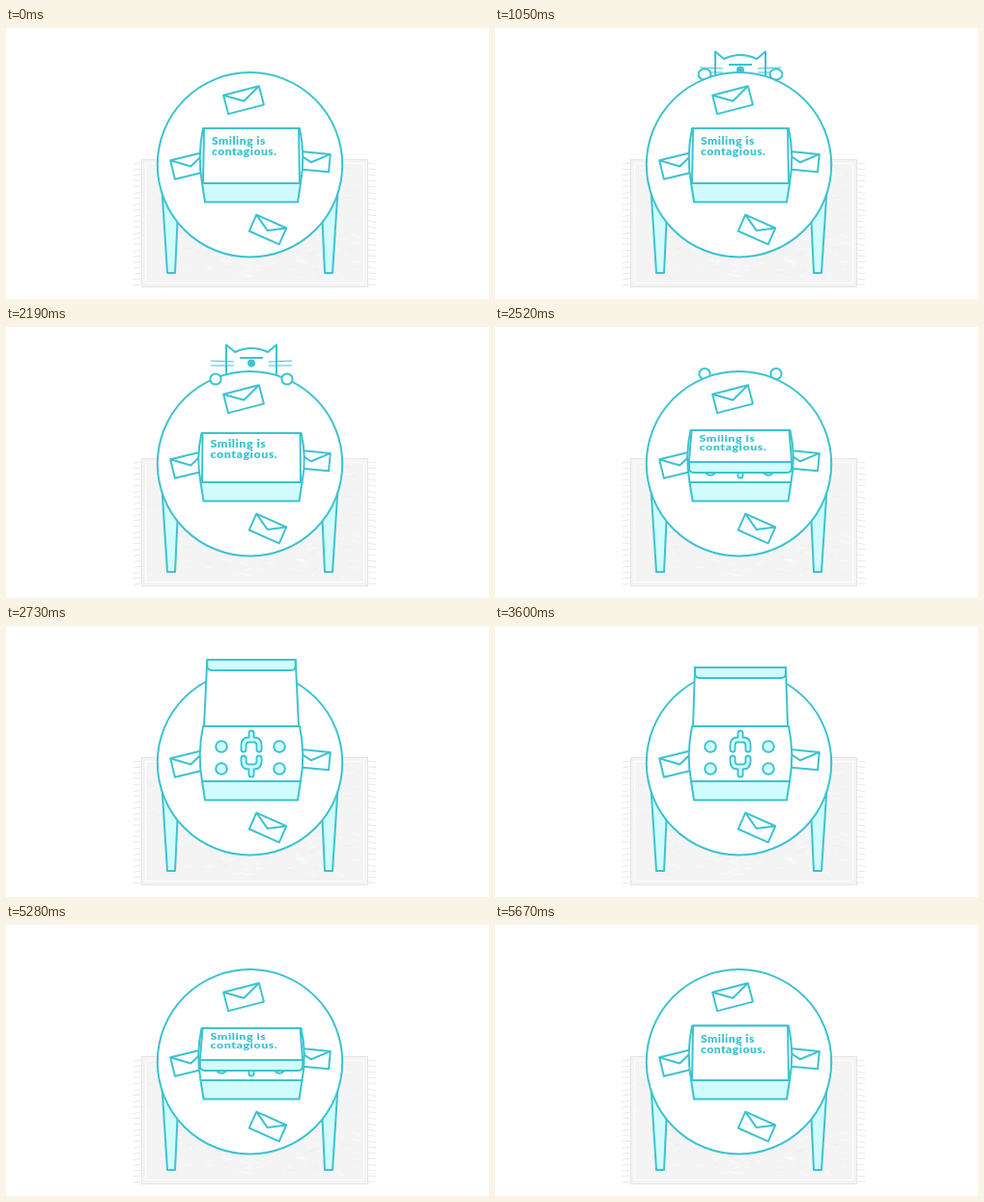
Animation of 500x281 px, one loop 5.7 s. Source, as an HTML page with a canvas:

```html
<!DOCTYPE html>
<html lang="en">
<head>
<meta charset="utf-8">
<title>Box on a table</title>
<style>
html, body { margin: 0; width: 100%; height: 100%; overflow: hidden; background: #fff; }
canvas { display: block; width: 500px; height: 281px; }
</style>
</head>
<body>
<canvas id="stage" width="500" height="281"></canvas>
<script>
const LOOP = 5700, LINE = '#3cc3d1', TINT = '#d0fcfd';
const stage = document.getElementById('stage');
const c = stage.getContext('2d');
const rug = makeRug();

// Eased value at time t from [time, value] keys.
function track(t, keys) {
  if (t <= keys[0][0]) return keys[0][1];
  for (let i = 1; i < keys.length; i++) {
    const [t0, a] = keys[i - 1], [t1, b] = keys[i];
    if (t < t1) {
      const k = (t - t0) / (t1 - t0);
      return a + (b - a) * k * k * (3 - 2 * k);
    }
  }
  return keys[keys.length - 1][1];
}

function shape(d, fill, width = 2) {
  const p = new Path2D(d);
  if (fill) { c.fillStyle = fill; c.fill(p); }
  c.strokeStyle = LINE;
  c.lineWidth = width;
  c.stroke(p);
}

function disc(x, y, r, fill, width = 2, ry = r) {
  c.beginPath();
  c.ellipse(x, y, r, ry, 0, 0, 7);
  c.fillStyle = fill;
  c.fill();
  c.strokeStyle = LINE;
  c.lineWidth = width;
  c.stroke();
}

function makeRug() {
  const layer = document.createElement('canvas');
  layer.width = 500;
  layer.height = 281;
  const g = layer.getContext('2d');
  let seed = 11;
  const rnd = () => (seed = seed * 16807 % 2147483647) / 2147483647;
  const dash = (x, y, dx, dy, color) => {
    g.strokeStyle = color;
    g.beginPath();
    g.moveTo(x, y);
    g.lineTo(x + dx, y + dy);
    g.stroke();
  };
  g.fillStyle = '#f4f4f4';
  g.fillRect(140, 136, 235, 133);
  for (let i = 0; i < 260; i++) {
    const shade = rnd() < 0.7 ? '#fbfbfb' : '#efefef';
    dash(145 + rnd() * 215, 142 + rnd() * 116, 2 + rnd() * 9, rnd() * 8 - 4, shade);
  }
  g.strokeStyle = '#e6e6e6';
  g.strokeRect(140.5, 136.5, 234, 132);
  g.strokeStyle = '#fcfcfc';
  g.strokeRect(144.5, 140.5, 226, 124);
  for (let y = 140; y < 268; y += 6) {
    dash(140, y, -8, rnd() * 2, '#e9e9e9');
    dash(375, y, 8, rnd() * 2, '#e9e9e9');
  }
  return layer;
}

function envelope(x, y, angle, w, h) {
  c.save();
  c.translate(x, y);
  c.rotate(angle * Math.PI / 180);
  shape(`M${-w / 2} ${-h / 2}h${w}v${h}h${-w}zL0 1L${w / 2} ${-h / 2}`, '#fff');
  c.restore();
}

function catHead(t) {
  const y = track(t, [[900, 50], [1050, 6], [1170, -4], [1320, 1], [1470, 0],
    [2190, 0], [2250, -4], [2400, 50]]);
  const twitch = 2 * track(t, [[1500, 0], [1560, 1], [1650, 0]]);
  c.save();
  c.translate(0, y);
  shape('M228 80V18.5L237 26Q254 18 271 26L280 18.5V80', '#fff');
  shape('M242 32H266');
  disc(254, 37.5, 3.6, LINE, 1);
  shape(`M212 ${35 - twitch}L236 36M212 ${40 - twitch}L236 40
    M296 ${35 - twitch}L272 36M296 ${40 - twitch}L272 40`, null, 1.2);
  c.restore();
}

function paws(t) {
  const y = track(t, [[900, 66], [1000, 48], [1080, 48], [1230, 54], [2280, 54], [2430, 48.5]]);
  const wide = track(t, [[1000, 1], [1050, 1.15], [1200, 1]]);
  for (const x of [217, 291]) disc(x, y, 5.6 * wide, '#fff', 2, 5.6);
}

function table() {
  shape('M161 160L167 254H175L178 190', TINT);
  shape('M344 160L338 254H330L327 190', TINT);
}

function treats() {
  for (const x of [223, 283]) for (const y of [125, 148]) disc(x, y, 5.8, TINT);
  const hooks = new Path2D('M246 128V124Q246 118 251 118H257Q262 118 262 124V128M254 118V111' +
    'M246 137V140Q246 146 251 146H257Q262 146 262 140V137M254 146V154');
  c.lineCap = 'round';
  c.strokeStyle = LINE;
  c.lineWidth = 7;
  c.stroke(hooks);
  c.strokeStyle = TINT;
  c.lineWidth = 3.2;
  c.stroke(hooks);
  c.lineCap = 'butt';
}

function label(x, top, sx, sy) {
  c.save();
  c.translate(x, top);
  c.scale(sx, sy);
  c.font = '900 12px Lato, sans-serif';
  c.letterSpacing = '0.5px';
  c.fillStyle = LINE;
  c.fillText('Smiling is', 0, 17.5);
  c.fillText('contagious.', 0, 28.5);
  c.restore();
}

function box(t) {
  const edge = track(t, [[2400, 161], [2520, 140], [2670, 50], [2730, 35], [2790, 46], [2850, 43],
    [5070, 43], [5130, 36], [5280, 140], [5370, 161]]);
  const top = track(t, [[1800, 104], [2100, 110], [2400, 110], [2520, 107], [2700, 104],
    [5130, 104], [5280, 107], [5400, 110], [5520, 103], [5670, 104.5]]);
  const s = track(t, [[1800, 0], [2100, 1], [2520, 1], [2700, 0],
    [5130, 0], [5280, 1], [5430, 1], [5550, -0.4], [5670, 0]]);
  const open = (161 - edge) / 118;
  const L = 203 - 1.5 * s, R = 305 + 1.5 * s;

  // inside, bulging sides and front panel
  shape(`M${L + 1} ${top}H${R - 1}Q${R + 5} ${(top + 161) / 2} ${R} 161H${L}
    Q${L - 5} ${(top + 161) / 2} ${L + 1} ${top}Z`, '#fff');
  if (open > 0.01) treats();
  shape(`M${L} 161H${R}L${R - 3} 180.5H${L + 3}Z`, TINT);

  // lid hinged at the back, with a flap hanging from its front edge
  const w = 50 + s + 5 * Math.sin(Math.PI * open) - 3 * open;
  const a = 254 - w, b = 254 + w;
  shape(`M${L + 2} ${top}H${R - 2}L${b} ${edge}H${a}Z`, '#fff');
  const drop = 11 * Math.min(1, open * 6);
  if (drop > 0.5) {
    shape(`M${a} ${edge}H${b}V${edge + drop * 0.55}
      Q${b} ${edge + drop} ${b - 5} ${edge + drop}H${a + 5}
      Q${a} ${edge + drop} ${a} ${edge + drop * 0.55}Z`, TINT);
  }
  if (edge > top + 3) {
    const sy = open > 0.01 ? Math.min(1, (edge - top) / 40) : 1;
    label(213 - 1.5 * s, top - 0.5 - 2 * s * (1 - open), 1 + 0.035 * s, sy);
  }
}

function draw(t) {
  c.fillStyle = '#fff';
  c.fillRect(0, 0, 500, 281);
  c.drawImage(rug, 0, 0);
  c.lineJoin = 'round';
  const catHere = t > 900 && t < 2700;
  const pawsOnTop = t > 1110 && t < 2370;
  if (catHere) {
    catHead(t);
    if (!pawsOnTop) paws(t);
  }
  table();
  disc(252.5, 141.8, 95.7, '#fff');
  if (catHere && pawsOnTop) paws(t);
  envelope(246, 74.7, -14.5, 38, 20);
  envelope(191, 142.5, -13.5, 38, 20);
  envelope(316, 138.3, 5.5, 38, 18.5);
  envelope(271, 209, 24, 34, 18.5);
  box(t);
}

function tick() {
  draw(performance.now() % LOOP);
  requestAnimationFrame(tick);
}
tick();
</script>
</body>
</html>
```
